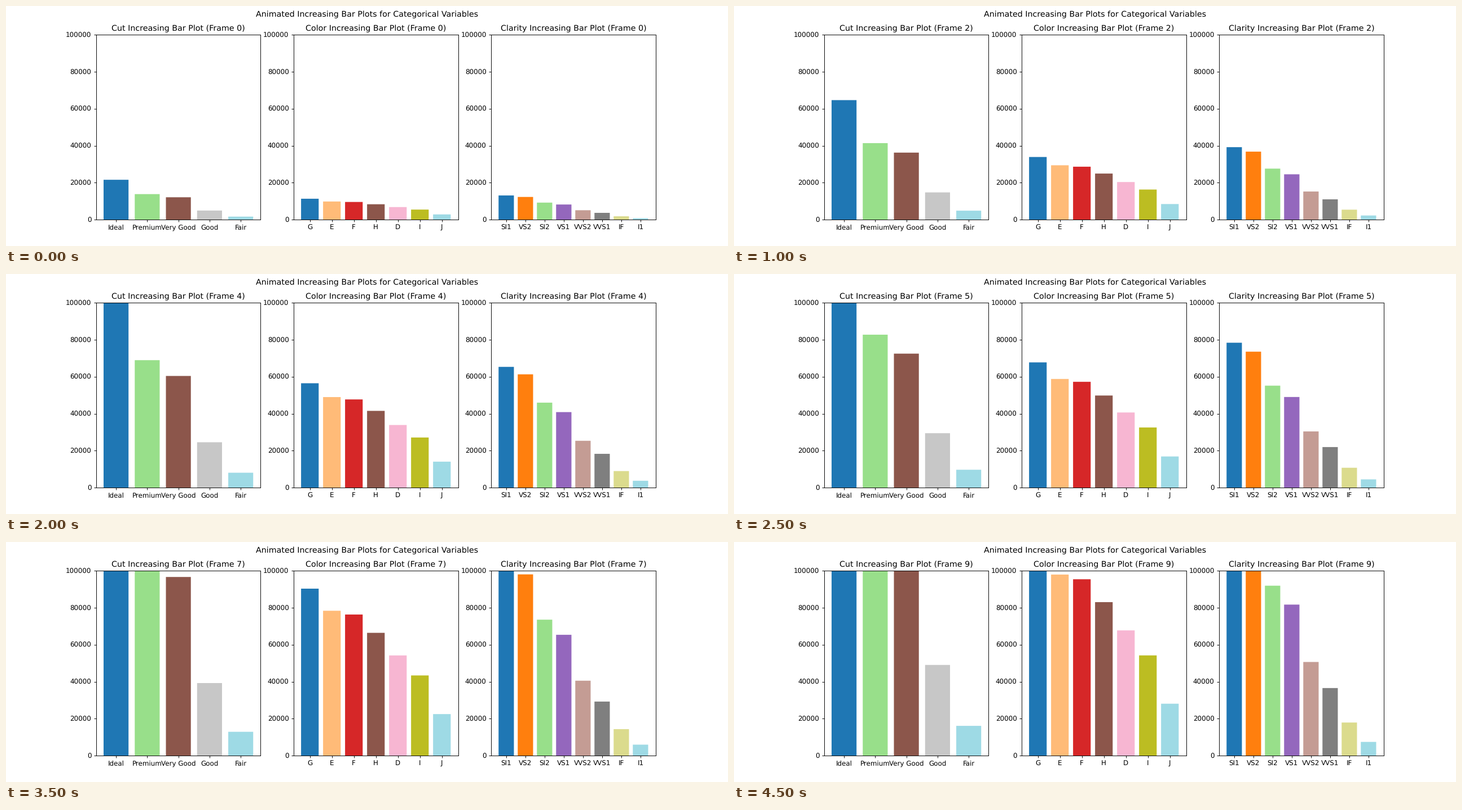
Recreate the animation shown at these times as a matplotlib script. Size 1280x427 px, loop 5 s.

```python
import matplotlib.pyplot as plt
import numpy as np
from matplotlib.animation import FuncAnimation

WIDTH, HEIGHT = 1280, 427
DPI = WIDTH / 15
FRAMES, INTERVAL = 10, 500
Y_MAX = 100000
LEFT, RIGHT = 159.73 / WIDTH, 1151.73 / WIDTH

COUNTS = {
    "Cut": {"Ideal": 21551, "Premium": 13791, "Very Good": 12082,
            "Good": 4906, "Fair": 1610},
    "Color": {"G": 11292, "E": 9797, "F": 9542, "H": 8304,
              "D": 6775, "I": 5422, "J": 2808},
    "Clarity": {"SI1": 13065, "VS2": 12258, "SI2": 9194, "VS1": 8171,
                "VVS2": 5066, "VVS1": 3655, "IF": 1790, "I1": 741},
}

plt.rcParams["font.family"] = "DejaVu Sans"
plt.rcParams["text.hinting"] = "none"

# The small margin keeps float rounding from losing a pixel.
fig, axes = plt.subplots(
    1, len(COUNTS), dpi=DPI,
    figsize=((WIDTH + 0.01) / DPI, (HEIGHT + 0.01) / DPI))
fig.subplots_adjust(left=LEFT, right=RIGHT)
fig.suptitle("Animated Increasing Bar Plots for Categorical Variables")


def make_panel(ax, counts):
    colors = plt.cm.tab20(np.linspace(0, 1, len(counts)))
    # Unsnapped bars keep soft, sub-pixel edges.
    bars = ax.bar(list(counts), list(counts.values()), color=colors,
                  snap=False)
    ax.set_ylim(0, Y_MAX)
    return bars


panels = [(name, ax, counts, make_panel(ax, counts))
          for ax, (name, counts) in zip(axes, COUNTS.items())]


def update(frame):
    for name, ax, counts, bars in panels:
        for bar, count in zip(bars, counts.values()):
            bar.set_height(count * (frame + 1))
        ax.set_title(f"{name} Increasing Bar Plot (Frame {frame})")
    return []


update(0)
anim = FuncAnimation(fig, update, frames=FRAMES, interval=INTERVAL,
                     init_func=lambda: update(0), repeat=True, repeat_delay=0)
plt.show()
```
